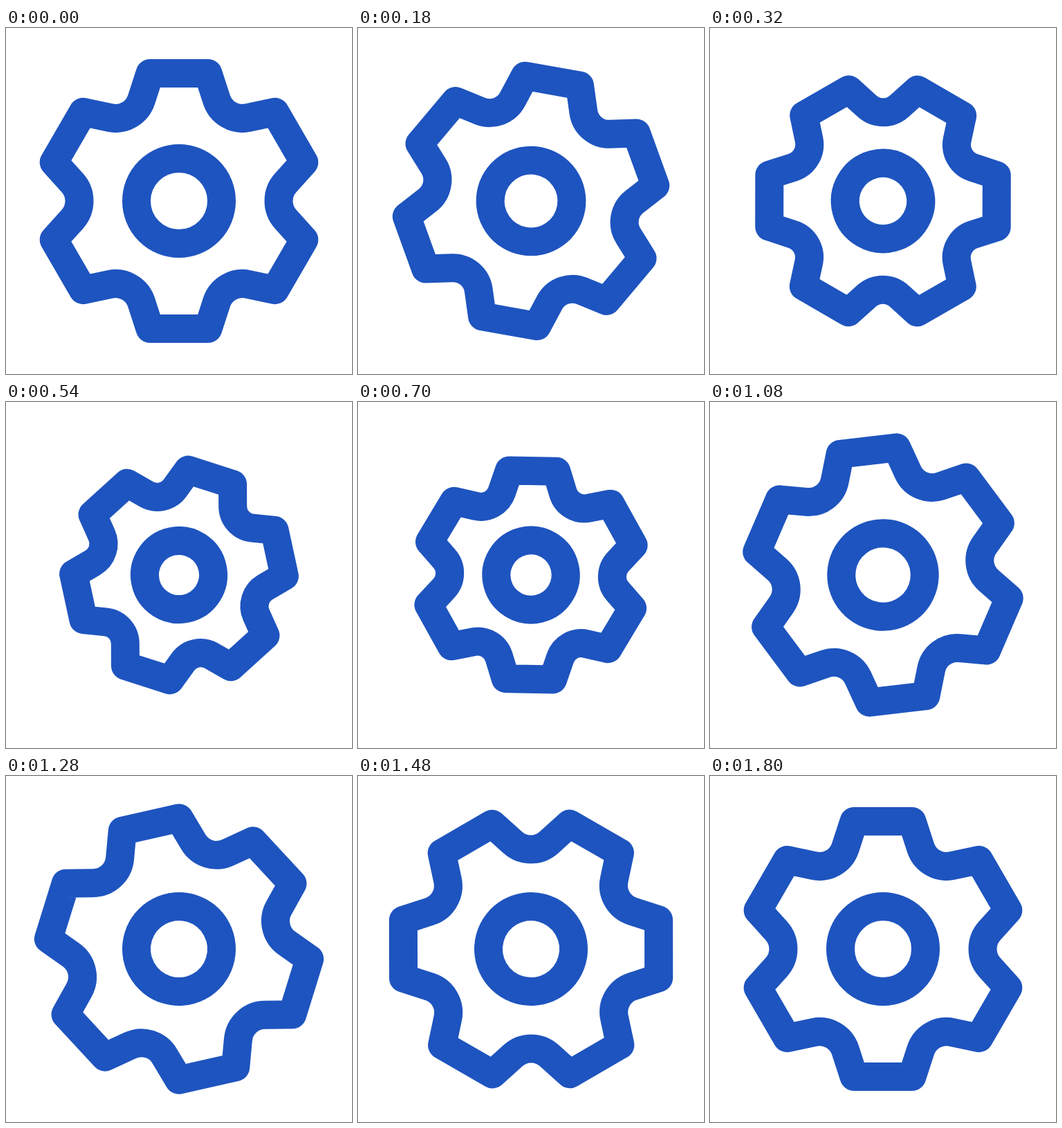
These frames come from a looping animation (500x500 px, 3.62 s). An HTML page with a canvas:

```html
<!DOCTYPE html>
<html lang="en">
<head>
<meta charset="utf-8">
<title>Turning gear</title>
<style>
  html, body { margin: 0; width: 100%; height: 100%; overflow: hidden; background: #fff; }
  canvas { display: block; }
</style>
</head>
<body>
<canvas width="500" height="500"></canvas>
<script>
const ctx = document.querySelector('canvas').getContext('2d');
const LOOP = 3620, TURN = 1800, SHRINK = 600, STEP = 20;
const TEETH = 6, TOOTH_HALF = 42, TOOTH_TOP = 184.5;
const VALLEY_DISTANCE = 183.1, VALLEY_RADIUS = 39.1, HUB_RADIUS = 61.5;

const rad = degrees => degrees * Math.PI / 180;
const smooth = x => {
  const p = Math.min(1, Math.max(0, x));
  return p * p * (3 - 2 * p);
};

function gearPath() {
  const gear = new Path2D();
  const pitch = 360 / TEETH;
  const tooth = new Path2D();
  tooth.moveTo(0, -TOOTH_TOP);
  for (let i = 0; i < TEETH; i++) {
    const turn = i * pitch, a = rad(turn), cos = Math.cos(a), sin = Math.sin(a);
    for (const x of [-TOOTH_HALF, TOOTH_HALF]) {
      gear.lineTo(x * cos + TOOTH_TOP * sin, x * sin - TOOTH_TOP * cos);
    }
    const valley = rad(turn + pitch / 2);
    gear.arc(VALLEY_DISTANCE * Math.sin(valley), -VALLEY_DISTANCE * Math.cos(valley),
      VALLEY_RADIUS, rad(turn + 162), rad(turn + 78), true);
  }
  gear.closePath();
  gear.moveTo(HUB_RADIUS, 0);
  gear.arc(0, 0, HUB_RADIUS, 0, 2 * Math.PI);
  gear.closePath();
  return gear;
}

const gear = gearPath();
ctx.strokeStyle = '#1e54bf';
ctx.lineWidth = 41;
ctx.lineJoin = 'round';

function draw(time) {
  const t = Math.floor(time % LOOP / STEP) * STEP;
  const angle = 360 * smooth(t / TURN);
  const scale = 1 - 0.2 * smooth(1 - Math.abs(t - SHRINK) / SHRINK);

  // The path is scaled on its own so the line keeps its width.
  const posed = new Path2D();
  posed.addPath(gear, new DOMMatrix().translate(250, 250).rotate(angle).scale(scale));
  ctx.clearRect(0, 0, 500, 500);
  ctx.stroke(posed);
}

const start = performance.now();
function tick() {
  draw(performance.now() - start);
  requestAnimationFrame(tick);
}
tick();
</script>
</body>
</html>
```
